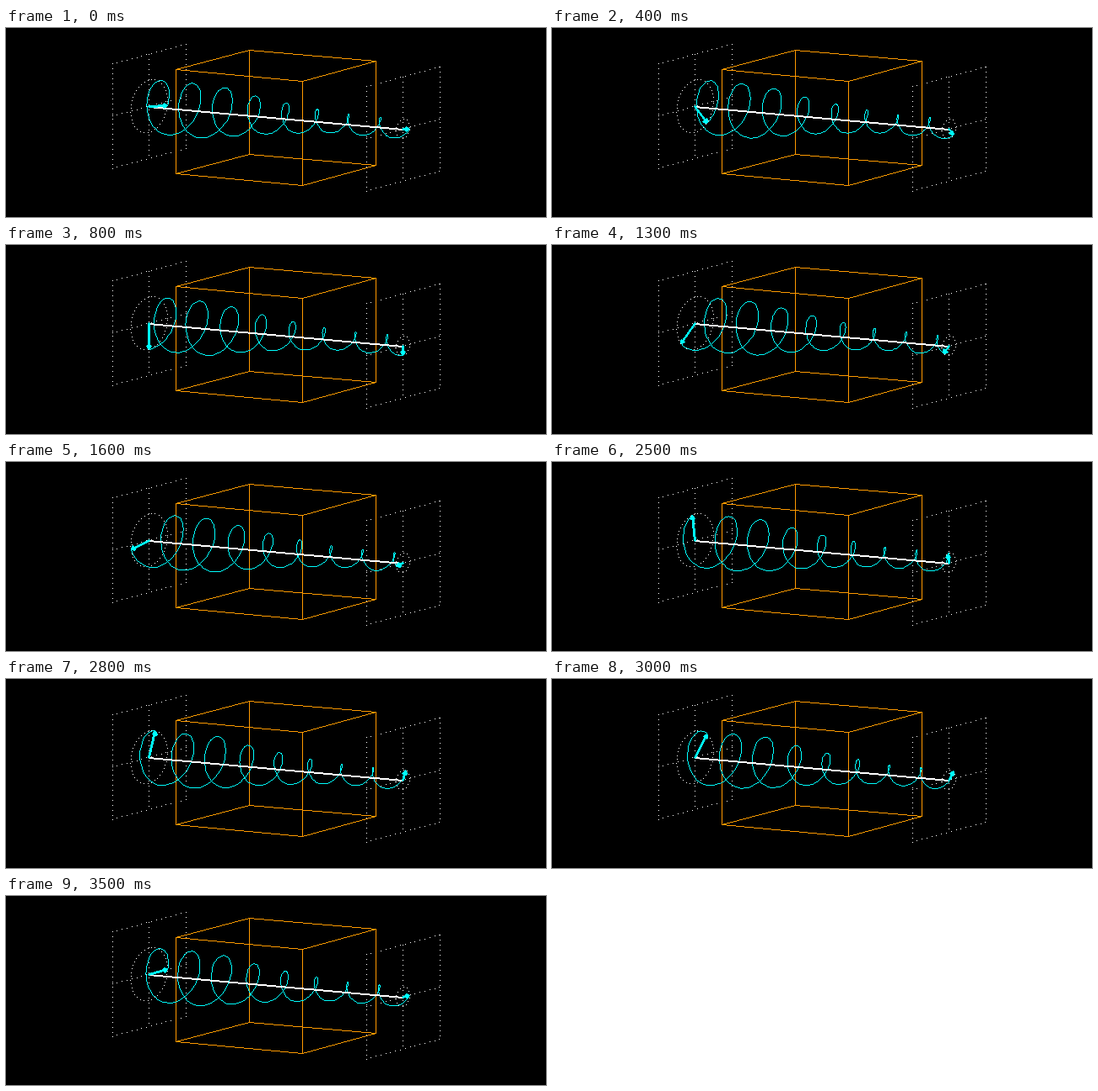
A matplotlib script for the animation above (3.6 s loop, 640 px wide and 225 px high).

```python
import numpy as np
import matplotlib.pyplot as plt
from matplotlib.animation import FuncAnimation

W, H, DPI = 640, 225, 100
FRAMES, INTERVAL = 36, 100
TURNS = 8

START = np.array([169.7, 94.2])
AXIS = np.array([300.8, 27.0])     # direction of travel
SIDE = np.array([43.5, -11.75])    # half width of a plane
UP = np.array([0.0, -62.1])        # half height of a plane
RADIUS = 0.5
BOX_IN, BOX_OUT = 0.25, 0.75
CYAN, ORANGE = "#00ffff", "#ff9900"

THIN = [(0, 0)]
DOUBLE = [(0, 0), (0, 1)]
CROSS = [(0, 0), (1, 0), (-1, 0), (0, 1), (0, -1)]


def project(s, u, v):
    s, u, v = np.broadcast_arrays(s, u, v)
    return START + s[..., None] * AXIS + u[..., None] * SIDE + v[..., None] * UP


def amplitude(s):
    depth = (np.clip(s, BOX_IN, BOX_OUT) - BOX_IN) / (BOX_OUT - BOX_IN)
    return RADIUS * np.exp(-depth)


def wave(s, n):
    phase = 2 * np.pi * (TURNS * s - (n + 1) / FRAMES)
    r = amplitude(s)
    return project(s, r * np.cos(phase), r * np.sin(phase))


def trace(points, pen=THIN):
    """Whole pixels of an aliased polyline drawn with a pen shape."""
    corners = np.floor(points)
    runs = []
    for a, b in zip(corners[:-1], corners[1:]):
        steps = int(np.abs(b - a).max())
        runs.append(np.floor(np.linspace(a, b, steps + 1) + 0.5))
    path = np.concatenate(runs)
    return np.concatenate([path + offset for offset in pen])


def plot_pixels(pixels, color, z):
    return ax.plot(*np.transpose(pixels), ",", color=color, zorder=z)[0]


def dots(points, gap):
    """Single pixels at even steps along a path."""
    dist = np.r_[0, np.cumsum(np.hypot(*np.diff(points, axis=0).T))]
    at = np.arange(0, dist[-1] + 0.01, gap)
    x, y = (np.floor(np.interp(at, dist, c)) for c in np.transpose(points))
    plot_pixels(np.column_stack([x, y]), "white", 1)


def dotted_plane(s):
    for c in (-1, 0, 1):
        dots(project(s, np.array([c, c]), np.array([1, -1])), 6)
        dots(project(s, np.array([-1, 1]), np.array([c, c])), 6)
    a = np.linspace(0, 2 * np.pi, 200)
    r = amplitude(s)
    dots(project(s, r * np.cos(a), r * np.sin(a)), 4.5)


def wire_box():
    u = np.array([-1, 1, 1, -1, -1])
    v = np.array([1, 1, -1, -1, 1])
    for s in (BOX_IN, BOX_OUT):
        plot_pixels(trace(project(s, u, v)), ORANGE, 2)
    ends = np.array([BOX_IN, BOX_OUT])
    for a, b in zip(u[:4], v[:4]):
        plot_pixels(trace(project(ends, a, b)), ORANGE, 2)


def arrow(s, n):
    base, tip = START + s * AXIS, wave(np.array(s), n)
    d = (tip - base) / np.hypot(*(tip - base))
    side = np.array([-d[1], d[0]])
    tip = tip - d
    back = tip - 3 * d
    return trace([base, tip, back + 2 * side, back - 2 * side, tip], CROSS)


fig = plt.figure(figsize=(W / DPI, H / DPI), dpi=DPI, facecolor="black")
ax = fig.add_axes([0, 0, 1, 1])
ax.set_xlim(0, W)
ax.set_ylim(H, 0)
ax.axis("off")

for s in (0, 1):
    dotted_plane(s)
wire_box()
plot_pixels(trace([START, START + AXIS], DOUBLE), "white", 4)

path = np.linspace(0, 1, 401)
helix = plot_pixels(trace(wave(path, 0)), CYAN, 3)
arrows = [plot_pixels(arrow(s, 0), CYAN, 5) for s in (0, 1)]


def update(n):
    helix.set_data(*trace(wave(path, n)).T)
    for s, art in enumerate(arrows):
        art.set_data(*arrow(s, n).T)
    return [helix, *arrows]


anim = FuncAnimation(fig, update, frames=FRAMES, interval=INTERVAL,
                     repeat=True, repeat_delay=0)
plt.show()
```
